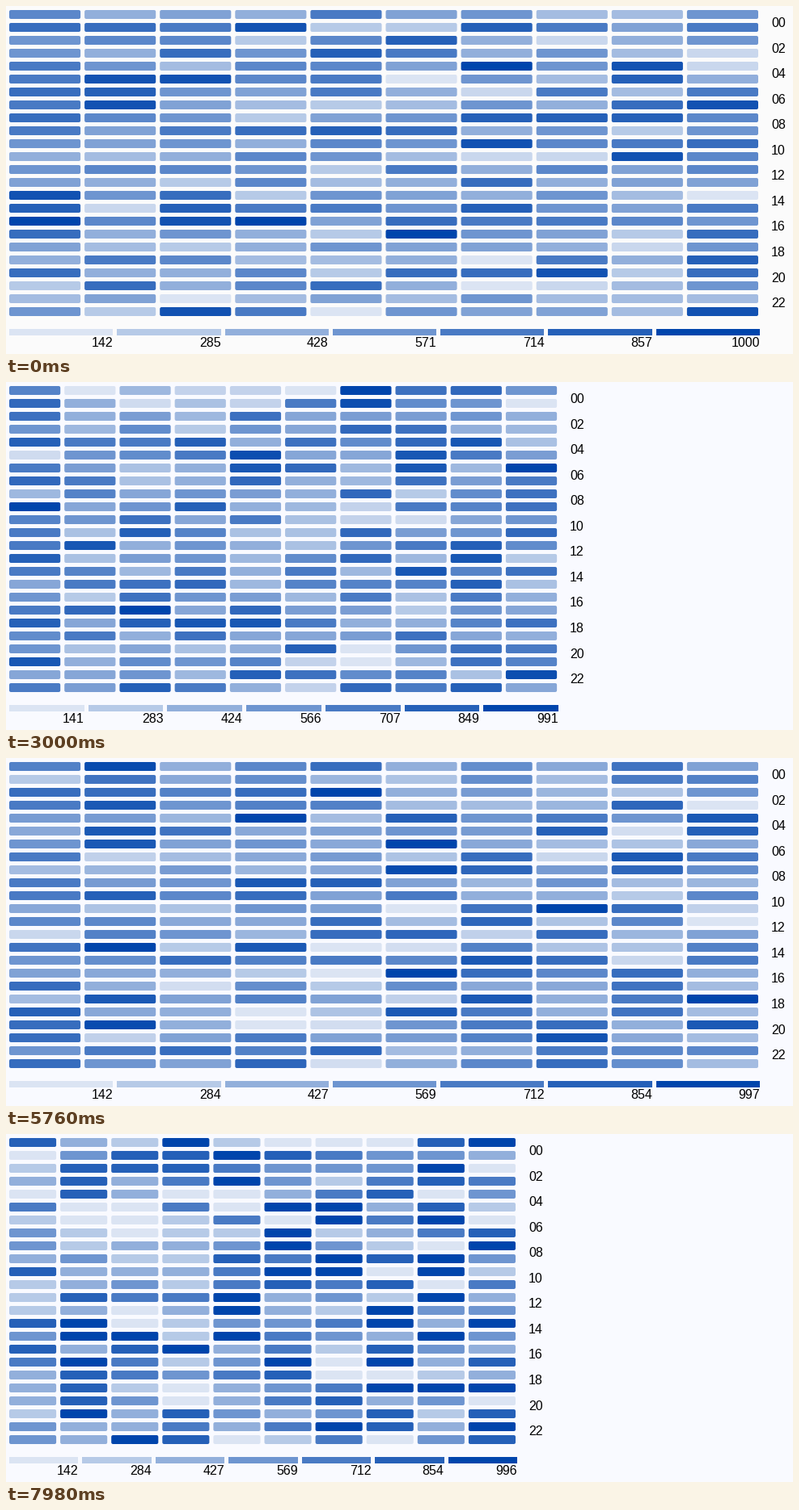
Recreate the animation shown at these times as a matplotlib script. Size 973 by 431 pixels, loop 8000 ms.

```python
import math

import numpy as np
import matplotlib.pyplot as plt
from matplotlib.animation import FuncAnimation
from matplotlib.collections import PolyCollection
from matplotlib.patches import Rectangle

STAGE_W, STAGE_H, DPI = 973, 431, 64
LOOP_MS, TICK_MS, STEP_MS = 8000, 20, 60
ROWS, COLS, LEVELS = 24, 10, 7
LEFT, GAP = 4, 5

LIGHT = np.array([219, 228, 243]) / 255
DARK = np.array([0, 69, 172]) / 255
PAPER = np.array([251, 251, 251]) / 255
BLUE_PAPER = np.array([249, 250, 255]) / 255

# start ms, steps, largest value
UPDATES = [(-60, 4, 1000), (780, 6, 998), (1920, 4, 982.8),
           (2700, 9, 991.1), (3840, 3, 994), (4620, 1, 1000),
           (5760, 4, 997), (6360, 1, 994), (7740, 5, 996.8)]
# start ms, steps, from width, to width, initial jump, easing power
RESIZES = [(2700, 9, 932, 452, 0, 1.62),
           (4620, 10, 452, 932, 0, 1.4),
           (6360, 10, 932, 632, 0.2, 1)]

rng = np.random.default_rng(24)
datasets = [rng.integers(0, LEVELS, ROWS * COLS)
            for _ in range(len(UPDATES) + 1)]
palette = LIGHT + (DARK - LIGHT) * np.linspace(0, 1, LEVELS)[:, None]


def progress(ms, start, steps):
    """Stepped progress: the first step is already visible at start."""
    return min(max((ms - start) // STEP_MS + 1, 0) / steps, 1)


def chart_width(ms):
    width = 932
    for start, steps, before, after, jump, power in RESIZES:
        if ms >= start:
            eased = jump + (1 - jump) * progress(ms, start, steps) ** power
            width = before + (after - before) * eased
    return width


def cell_colors(ms):
    colors = palette[datasets[0]]
    for (start, steps, _), data in zip(UPDATES, datasets[1:]):
        if ms >= start:
            colors = colors + (palette[data] - colors) * progress(ms, start, steps)
    return colors


def box(x, y, w, h, radius=0):
    if not radius:
        return [(x, y), (x + w, y), (x + w, y + h), (x, y + h)]
    corners = [(x + w - radius, y + h - radius, 0),
               (x + radius, y + h - radius, 90),
               (x + radius, y + radius, 180),
               (x + w - radius, y + radius, 270)]
    return [(cx + radius * math.cos(math.radians(a + d)),
             cy + radius * math.sin(math.radians(a + d)))
            for cx, cy, a in corners for d in (0, 30, 60, 90)]


def cell_boxes(width):
    pitch = (width - 1) / COLS
    return [box(LEFT + c * pitch, 5 + 16 * r, pitch - GAP, 11, 2)
            for r in range(ROWS) for c in range(COLS)]


def legend_boxes(width):
    pitch = (width + 1) / LEVELS
    return [box(LEFT + i * pitch, 400, pitch - GAP, 8) for i in range(LEVELS)]


fig = plt.figure(figsize=(STAGE_W / DPI, STAGE_H / DPI), dpi=DPI)
ax = fig.add_axes([0, 0, 1, 1])
ax.set_xlim(0, STAGE_W)
ax.set_ylim(STAGE_H, 0)
ax.axis("off")

cells = ax.add_collection(PolyCollection(cell_boxes(932), linewidths=0))
legend = ax.add_collection(
    PolyCollection(legend_boxes(932), facecolors=palette, linewidths=0))
margin = ax.add_patch(Rectangle((932, 0), STAGE_W, STAGE_H, lw=0, zorder=5))


def label(x, y, text, align, zorder):
    return ax.text(x, y, text, ha=align, va="baseline", color="black",
                   family="Liberation Sans", size=16 * 72 / DPI, zorder=zorder)


hours = [label(946, 26 + 31.55 * i, f"{2 * i:02d}", "left", 6)
         for i in range(ROWS // 2)]
ticks = [label(0, 422, "", "right", 4) for _ in range(LEVELS)]
drawn_width = None


def draw(frame):
    global drawn_width
    ms = frame * TICK_MS
    width = chart_width(ms)
    # While growing, the chart is laid out one step ahead of its container.
    inner = max(width, chart_width(ms + STEP_MS)) if 4620 <= ms < 5160 else width

    if (width, inner) != drawn_width:
        drawn_width = width, inner
        cells.set_verts(cell_boxes(inner))
        legend.set_verts(legend_boxes(inner))
        margin.set_x(width)
        for hour in hours:
            hour.set_x(width + 14)

    cells.set_facecolor(cell_colors(ms))
    paper = PAPER + (BLUE_PAPER - PAPER) * progress(ms, 780, 6)
    fig.set_facecolor(paper)
    margin.set_facecolor(paper)

    largest = [top for start, _, top in UPDATES if ms >= start][-1]
    pitch = (inner + 1) / LEVELS
    for i, tick in enumerate(ticks, 1):
        tick.set_x(LEFT + i * pitch - GAP)
        tick.set_text(str(int(largest * i / LEVELS)))
        tick.set_visible(tick.get_position()[0] <= width)
    return cells, legend, margin, *hours, *ticks


animation = FuncAnimation(fig, draw, frames=LOOP_MS // TICK_MS,
                          interval=TICK_MS, repeat=True, repeat_delay=0)
plt.show()
```
